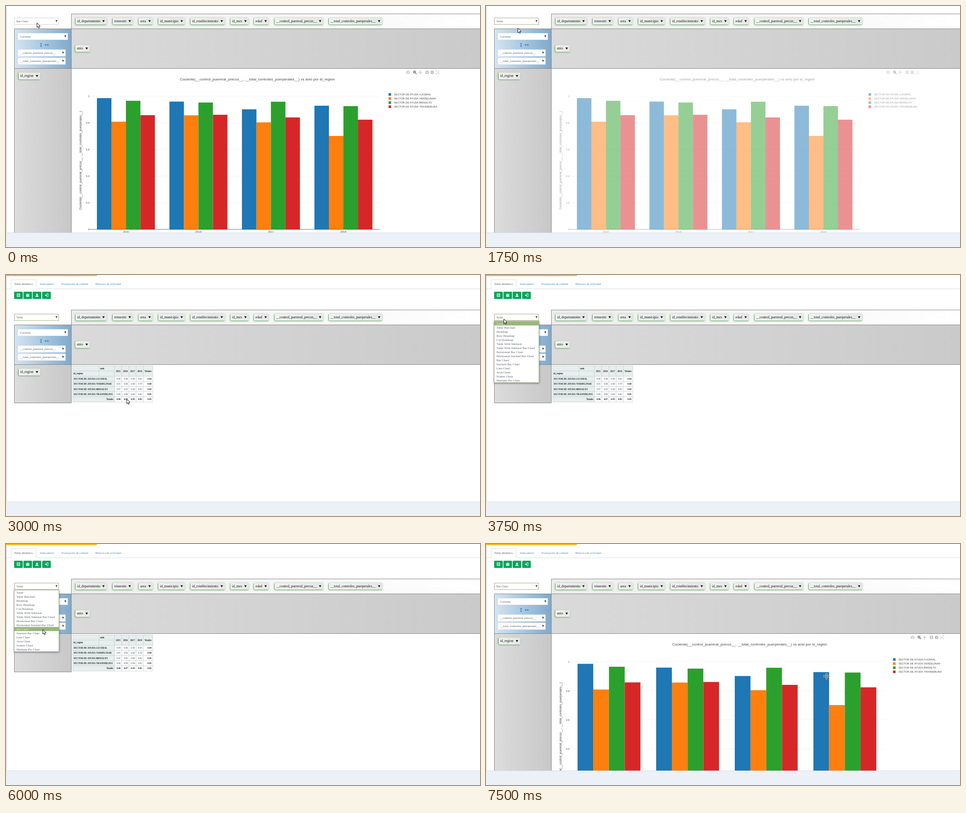
Write an HTML page with a canvas that moves like this. It is 1048 px wide and 534 px high and loops after 8000 ms.

```html
<!DOCTYPE html>
<html lang="es">
<head>
<meta charset="utf-8">
<title>Tabla dinámica</title>
<style>
html, body { margin: 0; width: 100%; height: 100%; overflow: hidden; background: #fff; }
canvas { display: block; width: 1048px; height: 534px; }
</style>
</head>
<body>
<canvas id="stage" width="1048" height="534"></canvas>
<script>
const ctx = document.getElementById('stage').getContext('2d');
const W = 1048, H = 534, LOOP = 8000, STEP = 250, SCROLL = 60, FOOT = 502;
const SERIF = '"Liberation Serif", serif', SANS = '"Liberation Sans", sans-serif';

const MODES = ['Table', 'Table Barchart', 'Heatmap', 'Row Heatmap', 'Col Heatmap',
  'Table With Subtotal', 'Table With Subtotal Bar Chart', 'Horizontal Bar Chart',
  'Horizontal Stacked Bar Chart', 'Bar Chart', 'Stacked Bar Chart', 'Line Chart',
  'Area Chart', 'Scatter Chart', 'Multiple Pie Chart'];
const BAR = 9, LIST_TOP = 102.8, ROW = 9.01;
const YEARS = ['2015', '2016', '2017', '2018'];
const MEASURES = ['__control_puereral_precoz__', '__total_controles_puerperales__'];
const RATIO = `Cociente(${MEASURES.join(', ')})`;
const SERIES = [
  { name: 'SECTOR DE AYUDA LUCERAL', color: '#1f77b4', values: [.986, .96, .902, .929], total: '0.94' },
  { name: 'SECTOR DE AYUDA VERDELINAR', color: '#ff7f0e', values: [.809, .857, .804, .702], total: '0.80' },
  { name: 'SECTOR DE AYUDA BRISALTO', color: '#2ca02c', values: [.966, .953, .959, .926], total: '0.95' },
  { name: 'SECTOR DE AYUDA TRASNEBLINA', color: '#d62728', values: [.858, .861, .841, .824], total: '0.85' }
];
const PILLS = [['id_departamento', 154, 223], ['trimestre', 236, 281], ['area', 293.5, 325],
  ['id_municipio', 337, 396], ['id_establecimiento', 408, 484.5], ['id_mes', 496.5, 537],
  ['edad', 548.5, 581.5], [MEASURES[0], 594, 702], [MEASURES[1], 714, 832.5]];

// Chart geometry in page coordinates
const NARROW = { right: 826.2, zero: 555, one: 260, titleX: 555.5, shift: 0 };
const WIDE = { right: 880.3, zero: 582.5, one: 261, titleX: 583, shift: 54 };

// Pointer path: time, x, y
const PATH = [[0, 68.5, 37.5], [250, 68.5, 37.5], [1250, 70.5, 49], [2250, 70.5, 49],
  [2500, 150, 150], [2750, 267, 275], [3000, 267, 275], [3500, 39.5, 97.5], [3750, 39.5, 97.5],
  [4750, 53, 187], [6000, 81.5, 189.5], [7000, 81.5, 189.5], [7500, 753, 293], [8000, 753, 293]];

function pointerAt(t) {
  const i = PATH.findIndex((p, k) => k > 0 && t < p[0]);
  const [a, b] = [PATH[i - 1], PATH[i]], f = (t - a[0]) / (b[0] - a[0]);
  return { x: a[1] + (b[1] - a[1]) * f, y: a[2] + (b[2] - a[2]) * f };
}

function rect(x, y, w, h, fill) {
  ctx.fillStyle = fill;
  ctx.fillRect(x, y, w, h);
}
function frame(x, y, w, h, color, width = 1) {
  ctx.strokeStyle = color;
  ctx.lineWidth = width;
  ctx.strokeRect(x, y, w, h);
}
function line(points, color, width = 1) {
  ctx.strokeStyle = color;
  ctx.lineWidth = width;
  ctx.beginPath();
  points.forEach(([x, y]) => ctx.lineTo(x, y));
  ctx.stroke();
}
function poly(points, fill) {
  ctx.fillStyle = fill;
  ctx.beginPath();
  points.forEach(([x, y]) => ctx.lineTo(x, y));
  ctx.closePath();
  ctx.fill();
}
function round(x, y, w, h, r, fill) {
  ctx.fillStyle = fill;
  ctx.beginPath();
  ctx.roundRect(x, y, w, h, r);
  ctx.fill();
}
function fade(x0, x1, from, to) {
  const g = ctx.createLinearGradient(x0, 0, x1, 0);
  g.addColorStop(0, from);
  g.addColorStop(1, to);
  return g;
}
function label(str, x, midY, size, color, { font = SERIF, align = 'left', bold = false } = {}) {
  ctx.font = `${bold ? 'bold ' : ''}${size}px ${font}`;
  ctx.textAlign = align;
  ctx.fillStyle = color;
  ctx.fillText(str, x, midY + size * (font === SANS ? .35 : .31));
}
function caret(x, y, color, half = 2.4) {
  poly([[x - half, y - 2.2], [x + half, y - 2.2], [x, y + 2.4]], color);
}

function tabs() {
  rect(0, 0, 201, 2.3, '#fdb10f');
  line([[2, 30.5], [11.5, 30.5], [11.5, 10.5], [66.5, 10.5], [66.5, 30.5], [W, 30.5]], '#dcdcdc');
  label('Tabla dinámica', 18, 20, 6.68, '#555');
  label('Indicadores', 75, 20, 6.68, '#3c8dbc');
  label('Evaluación de calidad', 122.7, 20, 6.68, '#3c8dbc');
  label('Bitácora de actividad', 197.7, 20, 6.68, '#3c8dbc');
}

function toolbar(hover) {
  [18, 38.5, 59, 80].forEach((x, i) =>
    round(x, 37, 19, 16, 1.5, i === 2 && hover ? '#00753f' : '#00a65a'));
  frame(24.5, 41.5, 6, 6.5, '#fff');
  [43.5, 45, 46.5].forEach(y => line([[25.5, y], [29.5, y]], '#fff', .7));
  rect(44.5, 43, 7, 5.2, '#fff');
  frame(46.7, 41.7, 2.6, 2, '#fff', .8);
  line([[44.5, 45.6], [51.5, 45.6]], '#00a65a', .6);
  rect(67.5, 41, 2, 3, '#fff');
  poly([[65.5, 43.5], [71.5, 43.5], [68.5, 46.5]], '#fff');
  rect(65, 46.5, 7, 2, '#fff');
  line([[89.5, 41.5], [93, 41.5], [93, 48], [89.5, 48]], '#fff');
  rect(86, 44, 3, 1.6, '#fff');
  poly([[88.5, 42.4], [91.3, 44.8], [88.5, 47.2]], '#fff');
}

function pill(name, x, right, midY) {
  ctx.save();
  ctx.shadowColor = 'rgba(30,140,30,.95)';
  ctx.shadowBlur = 3;
  ctx.shadowOffsetX = -.8;
  ctx.shadowOffsetY = .8;
  round(x, midY - 7.5, right - x, 15, 2.5, '#eee');
  ctx.restore();
  round(x, midY - 7.5, right - x, 15, 2.5, fade(x, right, '#f1f1f1', '#e6e6e6'));
  label(name, x + 3.3, midY, 7.65, '#111');
  caret(right - 7.5, midY + .2, '#111', 2.7);
}

function select(value, x, midY, w, h, border) {
  rect(x, midY - h / 2, w, h, '#fff');
  if (border) frame(x + .5, midY - h / 2 + .5, w - 1, h - 1, border);
  label(value, x + 5, midY + .4, 6.68, '#5a5a5a');
  caret(x + w - 5.3, midY - .2, '#444', 2.2);
}

function layout(mode, focused, bottom) {
  const edge = '#858585';
  rect(144, 77, W - 144, 33, fade(144, W, '#ececec', '#fff'));
  rect(144, 110, W - 144, 88, fade(144, W, '#dadada', '#cacaca'));
  rect(18, 110, 126, 88, fade(18, 144, '#d4e5f1', '#80a9cc'));
  rect(18, 198, 126, bottom - 198, fade(18, 144, '#dcdcdc', '#c8c8c8'));
  line([[W, 77.5], [144.5, 77.5], [144.5, bottom], [18.5, bottom], [18.5, 110.5], [W, 110.5]], edge);
  line([[18, 198.5], [W, 198.5]], edge);

  select(mode, 18, 93.7, 99, 15.5, focused ? '#a2aa88' : '#cfcfcf');
  select('Cociente', 26, 127.5, 110.5, 15, '#e8eef4');
  select(MEASURES[0], 26, 164, 105.5, 15, '#e8eef4');
  select(MEASURES[1], 26, 182, 105.5, 15, '#e8eef4');

  const blue = '#2d80c4';
  line([[77.5, 143], [77.5, 149.5]], blue);
  poly([[75.2, 144.3], [77.5, 141.5], [79.8, 144.3]], blue);
  poly([[75.2, 148.2], [77.5, 151], [79.8, 148.2]], blue);
  line([[87, 146.2], [93, 146.2]], blue);
  poly([[88.3, 143.9], [85.2, 146.2], [88.3, 148.5]], blue);
  poly([[91.7, 143.9], [94.8, 146.2], [91.7, 148.5]], blue);

  PILLS.forEach(([name, x, right]) => pill(name, x, right, 93.5));
  pill('anio', 153.5, 186, 154);
  pill('id_region', 28, 76, 215);
}

function modebar(dx) {
  const faint = '#c6c6c6';
  ctx.save();
  ctx.translate(dx, 207);
  round(885, -2.6, 8, 5.6, 1, faint);
  rect(887.3, -3.5, 3.4, 1.5, faint);
  ctx.lineWidth = 1.1;
  ctx.strokeStyle = '#fff';
  ctx.beginPath();
  ctx.arc(889, .2, 1.5, 0, 7);
  ctx.stroke();
  ctx.strokeStyle = '#777';
  ctx.lineWidth = 1.3;
  ctx.beginPath();
  ctx.arc(903.3, -.8, 2.4, 0, 7);
  ctx.stroke();
  line([[905, 1], [907.7, 3.6]], '#777', 1.6);
  line([[902, -.8], [904.6, -.8]], '#777', .8);
  line([[903.3, -2.1], [903.3, .5]], '#777', .8);
  line([[912, 0], [919.6, 0]], faint, 1.1);
  line([[915.8, -3.8], [915.8, 3.8]], faint, 1.1);
  [[-1, 0], [1, 0], [0, -1], [0, 1]].forEach(([u, v]) =>
    poly([[915.8 + u * 4.4, v * 4.4], [915.8 + u * 2.6 + v * 1.6, v * 2.6 + u * 1.6],
      [915.8 + u * 2.6 - v * 1.6, v * 2.6 - u * 1.6]], faint));
  [931, 942.3].forEach((x, i) => {
    round(x - 3.5, -3.3, 7, 6.6, .7, '#b8b8b8');
    line([[x - 2, 0], [x + 2, 0]], '#fff', 1.2);
    if (!i) line([[x, -2], [x, 2]], '#fff', 1.2);
  });
  line([[950.5, -3.5], [957.5, 3.5]], faint, .9);
  line([[957.5, -3.5], [950.5, 3.5]], faint, .9);
  [[-1, -1], [1, -1], [-1, 1], [1, 1]].forEach(([u, v]) =>
    poly([[954 + u * 4, v * 3.8], [954 + u * 1.8, v * 3.8], [954 + u * 4, v * 1.8]], faint));
  ctx.restore();
}

function chart({ right, zero, one, titleX, shift }, alpha) {
  const left = 185, unit = zero - one, group = (right - left) / 4, bar = group * .2;
  const ink = '#444', sans = { font: SANS };
  ctx.save();
  ctx.globalAlpha = alpha;
  for (let i = 0; i <= 5; i++) {
    const y = zero - unit * i / 5;
    if (i) line([[left + 1, y], [right, y]], '#eee', .8);
    label(String(i / 5), 184.7, y + .2, 5.72, ink, { font: SANS, align: 'right' });
  }
  YEARS.forEach((year, g) => {
    const x = left + group * (g + .1);
    SERIES.forEach(({ color, values }, s) =>
      rect(x + bar * s, zero - unit * values[g], bar, unit * values[g], color));
    label(year, left + group * (g + .5), zero + 4.6, 5.72, ink, { font: SANS, align: 'center' });
  });
  line([[left, zero], [right, zero]], ink, .8);

  label(`${RATIO} vs anio por id_region`, titleX, 222.3, 8.11, ink, { font: SANS, align: 'center' });
  ctx.save();
  ctx.translate(164.6, zero - unit * .5185);
  ctx.rotate(-Math.PI / 2);
  label(RATIO, 0, 0, 6.69, ink, { font: SANS, align: 'center' });
  ctx.restore();

  SERIES.forEach(({ name, color }, i) => {
    const y = 255.7 + i * 9.07;
    rect(right + 19.6, y - 2.6, 5.7, 5.7, color);
    label(name, right + 31.8, y + .2, 5.72, ink, sans);
  });
  modebar(shift);
  ctx.restore();
}

function pivotTable(alpha) {
  const xs = [147.5, 205.5, 240, 256, 272, 287.7, 303.5, 324.5];
  const rowY = i => 201.5 + i * 11.42;
  const ink = '#222', cell = (c, r, span, rows, fill) => {
    const x = xs[c], y = rowY(r), w = xs[c + span] - x, h = rows * 11.42;
    rect(x, y, w, h, fill);
    frame(x, y, w, h, '#c9cfcf', .8);
  };
  const put = (str, x, r, align, bold) => label(str, x, rowY(r) + 5.8, 5.1, bold ? ink : '#3d4a57', { align, bold });
  const head = '#e6eeee';
  ctx.save();
  ctx.globalAlpha = alpha;
  for (let r = 0; r < 2; r++) for (let c = 0; c < 2; c++) cell(c, r, 1, 1, head);
  put('anio', 208, 0, 'left', true);
  put('id_region', 149.5, 1, 'left', true);
  [...YEARS, 'Totales'].forEach((str, i) => {
    cell(i + 2, 0, 1, 2, head);
    put(str, (xs[i + 2] + xs[i + 3]) / 2, .5, 'center', true);
  });
  const rows = SERIES.map(s => [...s.values.map(v => v.toFixed(2)), s.total]);
  rows.push(['0.86', '0.87', '0.85', '0.82', '0.85']);
  rows.forEach((values, i) => {
    cell(0, i + 2, 2, 1, head);
    if (i < 4) put(SERIES[i].name, 149.5, i + 2, 'left', true);
    else put('Totales', 237.3, i + 2, 'right', true);
    values.forEach((v, c) => {
      cell(c + 2, i + 2, 1, 1, '#fff');
      put(v, xs[c + 3] - 2.7, i + 2, 'right', i === 4 || c === 4);
    });
  });
  ctx.restore();
}

function dropdown(active) {
  const h = ROW * MODES.length;
  ctx.save();
  ctx.shadowColor = 'rgba(0,0,0,.45)';
  ctx.shadowBlur = 4;
  ctx.shadowOffsetY = 1.5;
  rect(18, LIST_TOP - 1, 99.5, h + 2, '#fff');
  ctx.restore();
  MODES.forEach((name, i) => {
    const y = LIST_TOP + i * ROW;
    if (i === active) rect(18, y, 99, ROW, '#98b77a');
    label(name, 23, y + ROW / 2 + .1, 7, i === active ? '#eef2e0' : '#565c62');
  });
  frame(18, LIST_TOP - .8, 99, h + 1.4, '#96a47c');
}

function outlined(points, fill, stroke, width) {
  poly(points, fill);
  ctx.lineJoin = 'round';
  ctx.strokeStyle = stroke;
  ctx.lineWidth = width;
  ctx.stroke();
  ctx.lineJoin = 'miter';
}

function pointer({ x, y }, kind) {
  ctx.save();
  ctx.translate(x, y);
  if (kind === 'hand') {
    outlined([[-1.4, 0], [.4, 0], [.5, 3.6], [4, 4.4], [4.6, 5.5], [4.2, 8], [3.2, 10],
      [-1.6, 10], [-4.2, 6.2], [-3.4, 5.3], [-1.5, 6.6]], '#fff', '#111', 1);
  } else if (kind === 'cross') {
    [[3.4, 6.5, '#fff'], [1.7, 5.8, '#111'], [.6, 3.5, '#fff']].forEach(([w, r, color]) => {
      line([[-r, 0], [r, 0]], color, w);
      line([[0, -r], [0, r]], color, w);
    });
  } else {
    outlined([[0, 0], [0, 10.2], [2.3, 8.1], [3.9, 11.6], [5.6, 10.8], [4, 7.4], [7.1, 7.2]],
      '#fff', '#111', 1);
  }
  ctx.restore();
}

function draw(time) {
  const t = Math.floor(time / STEP) * STEP;
  const within = (a, b) => t >= a && t < b;
  const scrolled = t < 2000, offset = scrolled ? SCROLL : 0;
  const isOpen = within(500, 1750) || within(3750, 6750);
  const selected = within(1750, 6750) ? 0 : BAR;
  const showsTable = within(2000, 7000);
  const at = pointerAt(t);

  rect(0, 0, W, H, '#ecf0f7');
  rect(1, 0, W, FOOT, '#d6dae2');
  rect(2, 0, W, FOOT, '#fff');

  ctx.save();
  ctx.beginPath();
  ctx.rect(0, 0, W, FOOT);
  ctx.clip();
  ctx.translate(0, -offset);
  if (!scrolled) {
    tabs();
    toolbar(within(2000, 2500));
  }
  layout(MODES[selected], t >= 500, showsTable ? 283.5 : 640);
  if (showsTable) pivotTable(t >= 6750 ? .5 : 1);
  else chart(scrolled ? NARROW : WIDE, within(1750, 2000) ? .5 : 1);
  if (isOpen) {
    const hover = Math.floor((at.y + offset - LIST_TOP) / ROW);
    dropdown(hover >= 0 ? hover : selected);
  }
  ctx.restore();
  line([[1, FOOT + .5], [W, FOOT + .5]], '#d8dce4');

  pointer(at, within(2000, 2500) ? 'hand' : t > 7000 ? 'cross' : 'arrow');
}

const start = performance.now();
function tick() {
  draw((performance.now() - start) % LOOP);
  requestAnimationFrame(tick);
}
tick();
</script>
</body>
</html>
```
